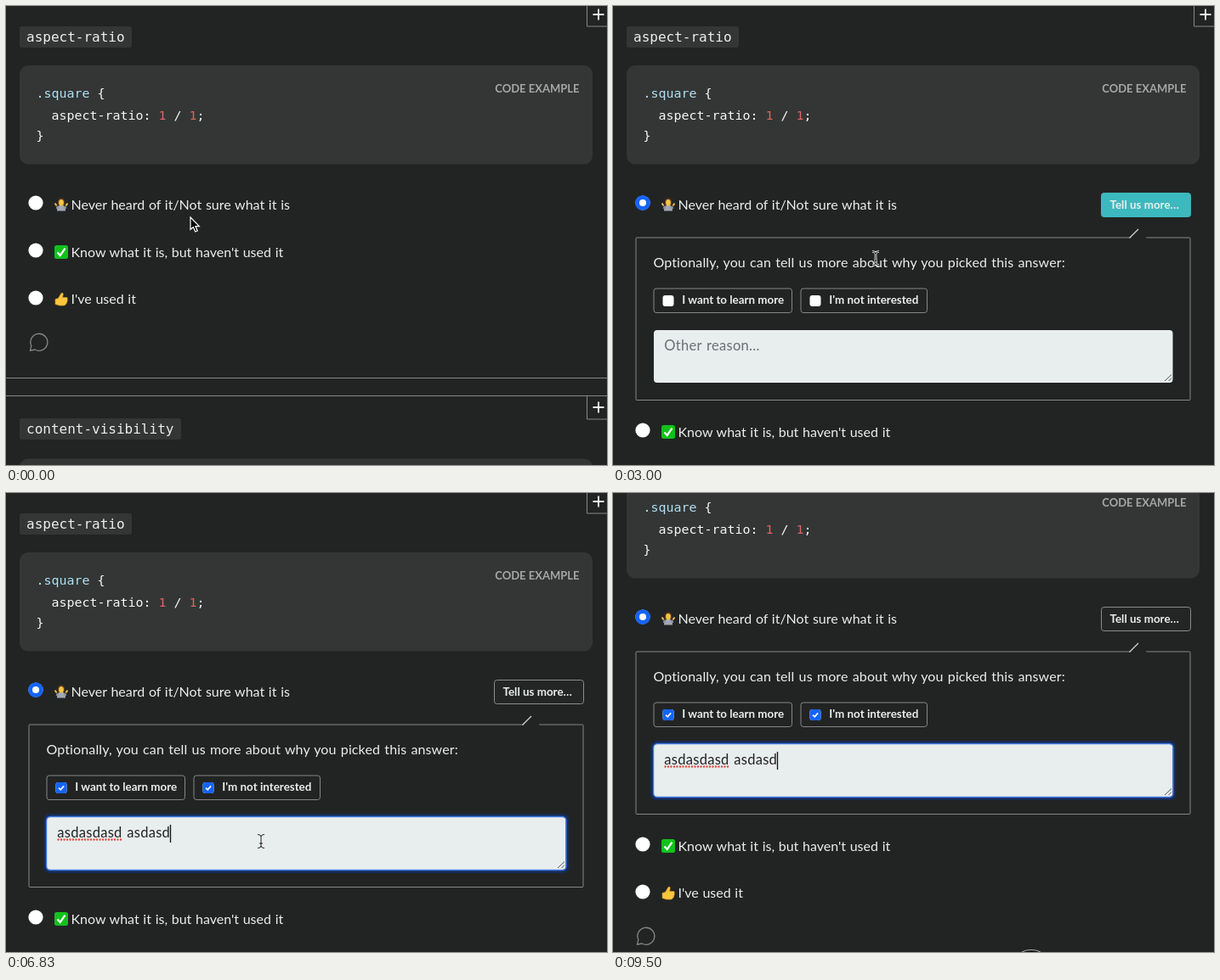
Animation of 707 by 541 pixels, one loop 9670 ms. Source, as an HTML page:

```html
<!DOCTYPE html>
<html lang="en">
<head>
<meta charset="utf-8">
<title>Survey question</title>
<style>
  html, body { margin: 0; width: 100%; height: 100%; overflow: hidden; background: #222424; }
  svg { display: block; width: 707px; height: 541px; }
  text { white-space: pre; fill: #eceeee; }
  .label, .intro { font: 16px Lato, sans-serif; word-spacing: .6px; }
  .intro { letter-spacing: .12px; word-spacing: 1px; }
  .input { font: 16.5px Lato, sans-serif; letter-spacing: .28px; word-spacing: 1.2px; fill: #222; }
  .hint { fill: #6a7173; }
  .bold { font: bold 13.4px Lato, sans-serif; }
  .tag { font: bold 13px Lato, sans-serif; fill: #a5a7a7; text-anchor: end; }
  .mono { font: 16px "DejaVu Sans Mono", monospace; }
  .code { font: 14.95px "DejaVu Sans Mono", monospace; fill: #f6f8f8; }
  .sel { fill: #b0e2f4; }
  .num { fill: #de6464; }
  .box { fill: #343636; }
  .line { fill: none; stroke: #858787; }
  .white { fill: #fff; }
  .blue { fill: #1464fa; }
  .tick { fill: none; stroke: #fff; stroke-width: 1.7; }
</style>
</head>
<body>
<svg viewBox="0 0 707 541">
  <defs>
    <g id="plus">
      <path class="line" d="M683.5 0V28H708"/>
      <path d="M690.5 14H703.5M697 7.5V20.5" stroke="#f0f2f2" stroke-width="1.8"/>
    </g>
    <circle id="radio" class="white" cx="35" r="8.6"/>
    <rect id="check" class="white" width="13" height="13" rx="3"/>
    <g id="checked">
      <rect class="blue" width="13" height="13" rx="3"/>
      <path class="tick" d="M3.6 6.7L5.7 8.8L9.6 4.4"/>
    </g>
    <g id="shrug">
      <path d="M3 15.500C3 10 5 8.500 8 8.500S13 10 13 15.500Z" fill="#a3a7b5"/>
      <path d="M4 9C3 2.500 5 .5 8 .5S13 2.500 12 9Z" fill="#5e361c"/>
      <ellipse cx="8" cy="5.800" rx="2.900" ry="3.700" fill="#f6c443"/>
      <path d="M4 10L2.800 13M12 10L13.200 13" stroke="#8d91a2" stroke-width="2.4"/>
      <path d="M.6 6.500L2.600 9.500M15.400 6.500L13.400 9.500" stroke="#eebc48" stroke-width="2"/>
    </g>
    <g id="tickbox">
      <rect width="16" height="16" rx="2.5" fill="#12c21c"/>
      <path d="M3.500 8.500L6.700 12L12.500 3.600" fill="none" stroke="#fff" stroke-width="2.2"/>
    </g>
    <path id="thumb" fill="#fcc63b" stroke="#d79a26" stroke-width=".6"
      d="M1 8L4.500 7L8 1Q10 0 10.300 2L9.500 6H14.500Q16 7 15 8.500Q16 10 14.600 11Q15 13 13.500 13.500Q13 15.500 11 15.500H6L1 14Z"/>
    <path id="ibeam" d="M-4-7.500Q0-7.500 0-5Q0-7.500 4-7.500M0-5V6M-4 8.500Q0 8.500 0 6Q0 8.500 4 8.500M-2 3H2"/>
  </defs>

  <g id="page">
    <rect id="hover" class="box" x="16" width="674" height="56"/>

    <use href="#plus" y="-4"/>
    <rect class="box" x="16" y="24" width="132" height="25" rx="3"/>
    <text class="mono" x="24" y="41.500">aspect-ratio</text>
    <rect class="box" x="16" y="70" width="674" height="116.500" rx="10"/>
    <text class="tag" x="674.500" y="102">CODE EXAMPLE</text>
    <text class="code" x="35.500" y="108"><tspan class="sel">.square</tspan> {</text>
    <text class="code" x="35.500" y="133.500">  aspect-ratio: <tspan class="num">1</tspan> / <tspan class="num">1</tspan>;</text>
    <text class="code" x="35.500" y="158">}</text>

    <use href="#radio" y="232"/>
    <g id="picked">
      <circle id="halo" cx="35" cy="232" r="11.500" fill="#12419b"/>
      <circle class="blue" cx="35" cy="232" r="8.800"/>
      <circle class="white" cx="35" cy="232" r="4"/>
    </g>
    <use href="#shrug" x="57" y="226"/>
    <text class="label" x="76.500" y="239.500">Never heard of it/Not sure what it is</text>
    <g id="more">
      <rect id="moreBox" x="574.500" y="220.500" width="105" height="28" rx="3"/>
      <text class="bold" x="584.500" y="238.500">Tell us more…</text>
    </g>

    <g id="panel">
      <rect class="line" x="27" y="273" width="652" height="191.500" rx="1"/>
      <path d="M607.500 274.500L618 263L628.500 274.500Z" fill="#222424"/>
      <path d="M607.500 273.500L618 263" stroke="#d3d5d5" stroke-width="1.3"/>
      <text class="intro" x="47.500" y="308">Optionally, you can tell us more about why you picked this answer:</text>
      <rect class="line" x="48" y="333" width="162.500" height="28.500" rx="3"/>
      <rect class="line" x="221" y="333" width="148.500" height="28.500" rx="3"/>
      <use href="#check" x="58.500" y="341"/>
      <use href="#check" x="231.500" y="341"/>
      <use id="check1" href="#checked" x="58.500" y="341"/>
      <use id="check2" href="#checked" x="231.500" y="341"/>
      <text class="bold" x="81.300" y="351">I want to learn more</text>
      <text class="bold" x="254.300" y="351">I'm not interested</text>

      <rect id="glow" x="44" y="378" width="618.500" height="70" rx="7" fill="#162b57"/>
      <rect x="48" y="382" width="610.500" height="62" rx="4" fill="#e8edee"/>
      <rect id="ring" x="47.500" y="381.500" width="611.500" height="63" rx="4.500" fill="none" stroke="#3f78e0" stroke-width="1.400"/>
      <path d="M649 442L657 434.500M653.500 442L657 438.500" stroke="#555"/>
      <text id="hint" class="input hint" x="60.300" y="406">Other reason…</text>
      <text id="typed" class="input" x="60.300" y="406"></text>
      <path id="wavy" d="M61.500 408.500H136" stroke="#e0483c" stroke-width="2.400" stroke-linecap="round" stroke-dasharray="0 3.500"/>
      <rect id="caret" y="391" width="1.300" height="21" fill="#111"/>
    </g>

    <g id="lower">
      <use href="#radio" y="288"/>
      <use href="#tickbox" x="57" y="282"/>
      <text class="label" x="76.500" y="295.500">Know what it is, but haven't used it</text>
      <use href="#radio" y="344"/>
      <use href="#thumb" x="57" y="337.500"/>
      <text class="label" x="76.500" y="351">I've used it</text>
      <path class="line" stroke-width="1.300" d="M28.500 406.200L29.800 400.500A10 10 0 1 1 34 405Z"/>
      <path id="edge" d="M0 438.500H707"/>
      <path class="line" d="M0 459.500H707"/>
      <use href="#plus" y="459"/>
      <rect class="box" x="16" y="486" width="190" height="25" rx="3"/>
      <text class="mono" x="24" y="504">content-visibility</text>
      <rect class="box" x="16" y="533.500" width="674" height="116.500" rx="10"/>
    </g>
  </g>

  <g id="pointer">
    <path id="arrow" d="M0 0V14.500L3.300 11.500L5.700 17L8.200 16L5.900 10.600H10.300Z" fill="#000" stroke="#fff" stroke-width="1.200"/>
    <path id="hand" fill="#fff" stroke="#000" d="M-1.500 1Q0-1 1.500 1V5Q3 4 4.200 5.500Q5.800 4.700 6.800 6.200Q9 6 9 8V11L7.500 15H0L-5 9Q-5 6.500-2.500 8L-1.500 9Z"/>
    <g id="beam" fill="none">
      <use href="#ibeam" stroke="#fff" stroke-width="2.600"/>
      <use href="#ibeam" stroke="#111"/>
    </g>
    <ellipse id="arc" cx="47" cy="8.500" rx="15" ry="8" fill="#111" stroke="#b4b6b6"/>
  </g>
</svg>
<script>
  const LOOP = 9670, TICK = 1000 / 6, LAST = 57;
  const PHRASE = 'asdasdasd asdasd';
  const el = {};
  document.querySelectorAll('svg [id]').forEach(n => el[n.id] = n);

  // tick, x, y
  const path = [
    [0, 217, 249], [1, 180, 246], [4, 42, 236], [6, 36, 234], [7, 36, 234],
    [12, 598, 236], [14, 599, 236], [15, 599, 236], [18, 309, 297],
    [20, 66, 347], [22, 66, 347], [24, 236, 347], [26, 238, 347],
    [28, 300, 410], [41, 300, 410], [45, 430, 520], [47, 445, 538], [LAST, 445, 538]
  ];
  const shapes = [
    [0, 'arrow'], [3, 'hand'], [8, 'arrow'], [12, 'hand'], [16, 'arrow'], [17, 'beam'],
    [19, 'hand'], [27, 'beam'], [29, ''], [41, 'beam'], [43, 'arrow'], [LAST, 'arc']
  ];
  const scrolls = [[0, 0], [50, 22], [51, 58], [52, 81], [53, 84], [54, 86]];

  const clamp = (v, lo, hi) => Math.max(lo, Math.min(hi, v));
  const show = (n, on) => n.style.display = on ? '' : 'none';
  const move = (n, x, y) => n.setAttribute('transform', `translate(${x} ${y})`);
  const held = (list, k) => list.filter(e => e[0] <= k).pop()[1];
  const paint = (n, fill, stroke) => { n.setAttribute('fill', fill); n.setAttribute('stroke', stroke); };

  function pointAt(k) {
    const i = path.findIndex(p => p[0] >= k);
    if (i < 1) return [path[0][1], path[0][2]];
    const a = path[i - 1], b = path[i], u = (k - a[0]) / (b[0] - a[0]);
    return [a[1] + (b[1] - a[1]) * u, a[2] + (b[2] - a[2]) * u];
  }

  function draw(k) {
    const open = k >= 15, writing = k >= 28, scroll = held(scrolls, k);
    const [x, y] = pointAt(k);
    move(el.page, 0, -scroll);
    move(el.lower, 0, open ? 212 : 0);
    move(el.pointer, x, y);
    const shape = held(shapes, k);
    ['arrow', 'hand', 'beam', 'arc'].forEach(s => show(el[s], s === shape));

    const tops = open ? [207, 475, 531] : [207, 263, 319];
    const top = tops.find(t => y + scroll >= t && y + scroll < t + 56);
    show(el.hover, k > 0 && top);
    if (top) el.hover.setAttribute('y', top);

    show(el.picked, k >= 6);
    show(el.halo, !open);
    show(el.more, k >= 6);
    const teal = '#3cb9be', hot = k >= 12 && k < 21;
    paint(el.moreBox, open && hot ? teal : '#242626', hot ? teal : '#8b8d8d');
    paint(el.edge, 'none', k >= 6 && !open ? teal : '#858787');

    show(el.panel, open);
    show(el.check1, k >= 21);
    show(el.check2, k >= 25);
    show(el.glow, writing);
    show(el.ring, writing);

    const count = k < 34 ? clamp(2 * (k - 28), 0, 9) : clamp(10 + 2 * (k - 35), 9, 16);
    el.typed.textContent = PHRASE.slice(0, count);
    show(el.hint, !count);
    show(el.wavy, count > 9);
    const blinkOn = Math.floor(k / 3) % 2 === 1;
    show(el.caret, writing && (k < 39 || blinkOn));
    if (open) el.caret.setAttribute('x', 60 + (count ? el.typed.getComputedTextLength() : 0));
  }

  let shown = -1;
  function loop() {
    const k = Math.min(LAST, Math.floor((performance.now() % LOOP + 4) / TICK));
    if (k !== shown) draw(shown = k);
    requestAnimationFrame(loop);
  }
  loop();
</script>
</body>
</html>
```
